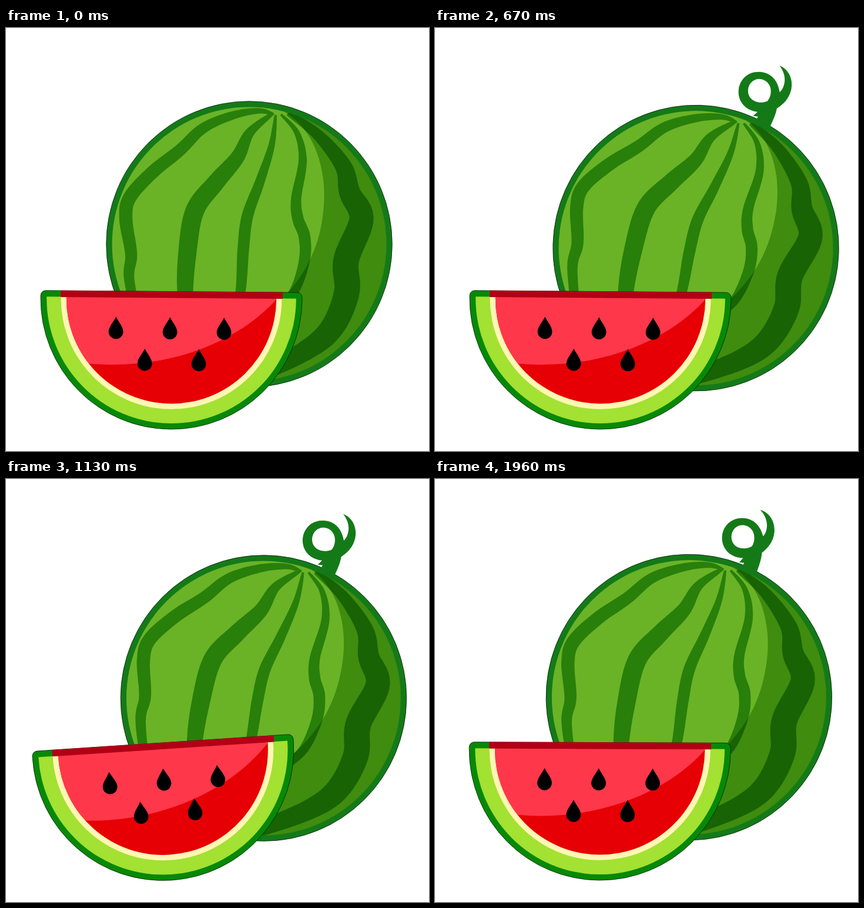
These frames come from a looping animation (720x720 px, 2 s). An HTML page:

```html
<!DOCTYPE html>
<html lang="en">
<head>
<meta charset="utf-8">
<title>Watermelon</title>
<style>
  html, body { margin: 0; width: 100%; height: 100%; overflow: hidden; background: #fff; }
  svg { display: block; width: 100vw; height: 100vh; }
  .shade { fill: #98c75e; mix-blend-mode: multiply; }
  .edge { stroke: #06200a; stroke-width: .8; }
</style>
</head>
<body>
<svg viewBox="0 0 720 720">
  <defs>
    <clipPath id="inside"><circle cx="414" cy="368" r="233.5"/></clipPath>
    <clipPath id="below"><path d="M40 459H520V700H40Z"/></clipPath>
    <clipPath id="flesh"><circle cx="280" cy="460.8" r="178.7"/></clipPath>
    <mask id="reveal" maskUnits="userSpaceOnUse" x="440" y="20" width="180" height="170">
      <path id="trace" pathLength="1" fill="none" stroke="#fff" stroke-width="32"
        d="M527 174C545 150 552 130 553 112C553 85 540 73 524 73C507 73 498 86 498 101C498 117 510 127 525 127C545 127 572 112 573 90C573 72 566 62 550 47"/>
    </mask>
  </defs>

  <g id="melon">
    <circle class="edge" cx="414" cy="368" r="243.3" fill="#147a18"/>
    <g id="stem">
      <g transform="rotate(-4.6 377 608)">
        <path mask="url(#reveal)" fill="#147a18" fill-rule="evenodd"
          d="M555 53C573 58 581 76 579 92C577 108 568 118 558 126C557 138 553 148 549 160L545 170L515 160L518 144L526 135C505 135 490 120 490 101C490 82 504 67 524 67C543 67 555 79 560 98C566 92 573 72 555 53Z
             M525 79C536 79 545 88 545 100C545 106 544 110 541 115C537 118 530 119 525 118.5C514 118 506 110 506 99C506 88 514 79 525 79Z"/>
      </g>
    </g>
    <g clip-path="url(#inside)" style="isolation:isolate">
      <circle cx="414" cy="368" r="234" fill="#6ab327"/>
      <g id="stripes" fill="#287f0a"></g>
      <path class="shade" d="M468 140C530 170 545 250 541 300C537 370 510 430 440 490C380 540 280 570 220 560L300 700H700V100H468Z"/>
    </g>
  </g>

  <g id="slice">
    <path class="edge" fill="#078907" d="M66 448.5H494a8.5 8.5 0 0 1 8.5 8.5v3.5A222.5 222.5 0 0 1 57.5 460.5v-3.5a8.5 8.5 0 0 1 8.5-8.5Z"/>
    <g clip-path="url(#below)">
      <circle cx="280" cy="460.8" r="212.3" fill="#a3e133"/>
      <circle cx="280" cy="460.8" r="188" fill="#fff6b4"/>
      <circle cx="280" cy="460.8" r="178.7" fill="#e60005"/>
      <path clip-path="url(#flesh)" fill="#ff374a" d="M90 459H460C395 534 273 584 139 572L90 560Z"/>
    </g>
    <path fill="#b10016" d="M91.5 448.2H469.5V459.5H91.5Z"/>
    <g id="seeds"></g>
  </g>
</svg>

<script>
const el = id => document.getElementById(id);
const { sin, cos, exp, max, min, hypot, PI } = Math;

function addPath(parent, d) {
  const path = document.createElementNS('http://www.w3.org/2000/svg', 'path');
  path.setAttribute('d', d);
  el(parent).append(path);
}

// Catmull-Rom point at u, counted in key points
function along(pts, u) {
  const i = min(pts.length - 2, Math.floor(u)), t = u - i;
  const [a, b, c, e] = [pts[max(0, i - 1)], pts[i], pts[i + 1], pts[min(pts.length - 1, i + 2)]];
  return [0, 1].map(k => b[k] + t / 2 * (c[k] - a[k]
    + t * (2 * a[k] - 5 * b[k] + 4 * c[k] - e[k] + t * (3 * (b[k] - c[k]) + e[k] - a[k]))));
}

// A ribbon around a smooth line, narrow at the crown and widest past the middle
function stripe(width, text) {
  const pts = text.split(' ').map(p => p.split(',').map(Number));
  const left = [], right = [], steps = 80;
  for (let n = 0; n <= steps; n++) {
    const s = n / steps, u = s * (pts.length - 1);
    const [x, y] = along(pts, u);
    const [x0, y0] = along(pts, max(0, u - .02)), [x1, y1] = along(pts, min(pts.length - 1, u + .02));
    const r = width / 2 * sin(PI * (.06 + .74 * s)) / hypot(x1 - x0, y1 - y0);
    const dx = (y1 - y0) * r, dy = (x0 - x1) * r;
    left.push([x + dx, y + dy]);
    right.unshift([x - dx, y - dy]);
  }
  addPath('stripes', 'M' + [...left, ...right].map(p => p.map(v => v.toFixed(1))).join('L') + 'Z');
}

stripe(23, '456,147 430,141 385,149 335,171 296,208 250,245 211,288 204,325 213,385 210,430 232,530');
stripe(32, '452,147 415,178 394,220 358,262 321,312 308,390 305,460 310,540');
stripe(20, '459,148 452,200 432,262 411,320 404,375 399,450 384,530');
stripe(20, '468,147 495,178 505,225 494,290 497,325 508,355 508,395 491,447 460,482');
stripe(44, '480,145 530,181 574,235 585,280 605,325 579,395 580,450 555,510 510,549 430,590');

for (const [count, x, y] of [[3, 186, 511.3], [2, 235.5, 565.2]])
  for (let i = 0; i < count; i++)
    addPath('seeds', `M${x + 92 * i} ${y - 19}c4 8.5 12.4 17 12.4 25.3a12.4 12.4 0 0 1-24.8 0c0-8.3 8.4-16.8 12.4-25.3Z`);

// Ringing that starts at full strength; 12 ticks per swing, 24 ticks per second
const ring = (amp, t) => amp * exp(-max(0, t) / 14) * cos(PI * max(0, t) / 6);

// Rocking that starts from rest and dies out as the loop ends
const rock = (amp, t) => t < 0 ? 0 : amp * (1 - t / 40) ** 1.4 * sin(PI * t / 6);

function draw(ms) {
  const t = min(47, Math.floor(ms * .024 + .1));
  const grow = max(0, min(1, (t - 3) / 9));
  const lean = -ring(19, t - 7.6);
  el('trace').setAttribute('stroke-dasharray', `${grow} 2`);
  el('stem').setAttribute('visibility', grow ? 'visible' : 'hidden');
  el('stem').setAttribute('transform', `translate(0 ${lean * .2}) rotate(${lean} 498 148)`);
  el('melon').setAttribute('transform', `rotate(${4.6 - ring(4.6, t - 9.3)} 377 608)`);
  el('slice').setAttribute('transform', `rotate(${.45 - rock(18.3, t - 10)} 280 655)`);
}

const start = performance.now();
function tick() {
  draw((performance.now() - start) % 2000);
  requestAnimationFrame(tick);
}
tick();
</script>
</body>
</html>
```
